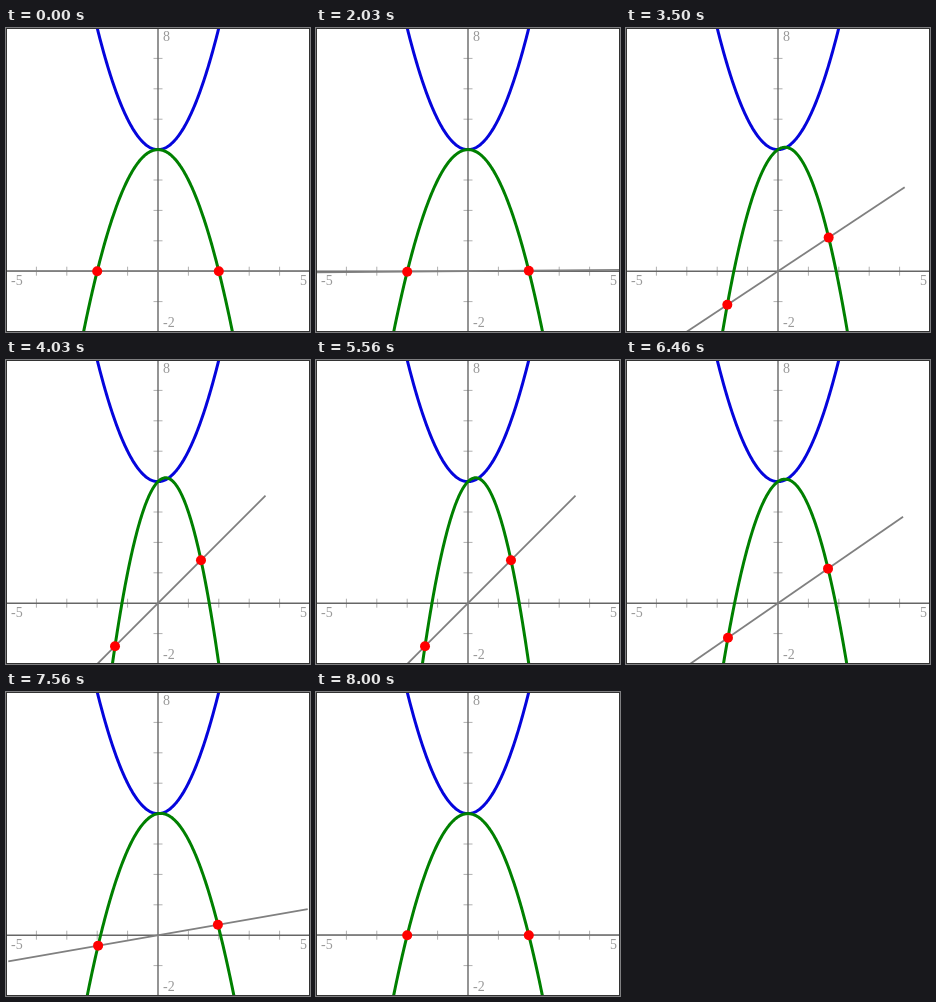
Write an HTML page with a canvas that moves like this. It is 304x304 px and loops after 8030 ms.

```html
<!DOCTYPE html>
<html lang="en">
<head>
<meta charset="utf-8">
<title>Parabola and rotating line</title>
<style>
html, body { margin: 0; width: 100%; height: 100%; overflow: hidden; background: #fff; }
canvas { display: block; width: 304px; height: 304px; }
</style>
</head>
<body>
<canvas id="stage" width="304" height="304"></canvas>
<script>
const SIZE = 304, UNIT = 30.4, OX = 152, OY = 243.2, LOOP = 8030;
const ctx = document.getElementById('stage').getContext('2d');
const px = x => OX + x * UNIT;
const py = y => OY - y * UNIT;

// Hold flat, turn up to 45 degrees, hold, turn back.
function angleAt(t) {
  const ramp = start => Math.min(1, Math.max(0, (t - start) / 2000));
  return (ramp(2010) - ramp(6000)) * Math.PI / 4;
}

function segment(x1, y1, x2, y2, color, width) {
  ctx.strokeStyle = color;
  ctx.lineWidth = width;
  ctx.beginPath();
  ctx.moveTo(x1, y1);
  ctx.lineTo(x2, y2);
  ctx.stroke();
}

function curve(f, color) {
  ctx.strokeStyle = color;
  ctx.lineWidth = 3;
  ctx.beginPath();
  for (let x = -3; x <= 3.001; x += 0.02) ctx.lineTo(px(x), py(f(x)));
  ctx.stroke();
}

function dot(x, y) {
  ctx.fillStyle = '#ff0000';
  ctx.beginPath();
  ctx.arc(px(x), py(y), 5, 0, 2 * Math.PI);
  ctx.fill();
}

function axes() {
  for (let i = -4; i <= 4; i++) {
    if (i) segment(px(i), OY - 4.5, px(i), OY + 4.5, '#b0b0b0', 1);
  }
  for (let i = -1; i <= 7; i++) {
    if (i) segment(OX - 4.5, py(i), OX + 4.5, py(i), '#b0b0b0', 1);
  }
  segment(0, OY, SIZE, OY, '#666', 1.4);
  segment(OX, 0, OX, SIZE, '#666', 1.4);

  ctx.fillStyle = '#999';
  ctx.font = '14px "Liberation Serif", "Times New Roman", serif';
  ctx.fillText('8', 157, 13);
  ctx.fillText('-2', 157, 299);
  ctx.fillText('-5', 5, 257);
  ctx.fillText('5', 294, 257);
}

function draw(t) {
  const a = angleAt(t), c = Math.cos(a), s = Math.sin(a);
  ctx.fillStyle = '#fff';
  ctx.fillRect(0, 0, SIZE, SIZE);
  axes();
  segment(px(-5 * c), py(-5 * s), px(5 * c), py(5 * s), '#808080', 1.8);
  curve(x => x * x + 4, '#0505dc');
  curve(x => 4 + x * s / c - x * x / (c * c), '#008000');
  dot(-2 * c, -2 * s);
  dot(2 * c, 2 * s);
  ctx.strokeStyle = '#333';
  ctx.lineWidth = 1;
  ctx.strokeRect(0.5, 0.5, SIZE - 1, SIZE - 1);
}

const begin = performance.now();
function tick() {
  draw((performance.now() - begin) % LOOP);
  requestAnimationFrame(tick);
}
tick();
</script>
</body>
</html>
```
